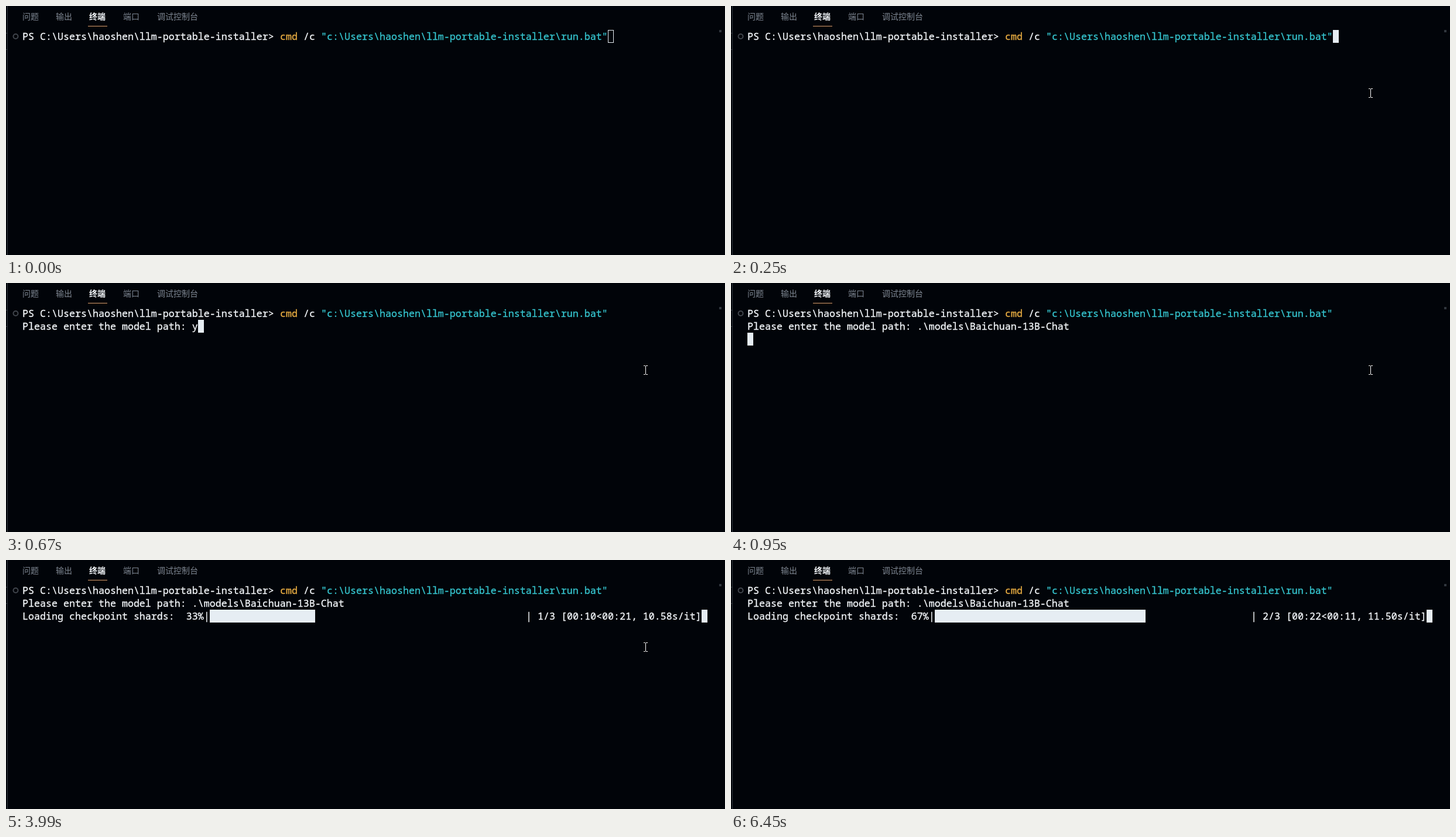
Animation, 1228 px wide and 426 px high, one loop 8000 ms. Source, as an HTML page with a canvas:

```html
<!DOCTYPE html>
<html lang="zh-CN">
<head>
<meta charset="utf-8">
<title>Terminal</title>
<style>
  html, body { margin: 0; width: 100%; height: 100%; overflow: hidden; background: #010409; }
  canvas { display: block; width: 1228px; height: 426px; }
</style>
</head>
<body>
<canvas id="stage" width="1228" height="426"></canvas>
<script>
const LOOP = 8000;
const LEFT = 28, TOP = 41, CELL_W = 10, CELL_H = 22, BASELINE = 17;
const FG = "#f4f7fa", BLOCK = "#e6edf3", DIM = "#7d8590", LINE = "#30363d";
const MONO = '16.667px "Noto Sans Mono", monospace';
const TAB_FONT = '14px "Noto Sans CJK SC", "Noto Sans CJK", sans-serif';

const ctx = document.getElementById("stage").getContext("2d", { alpha: false });

const DIR = String.raw`:\Users\haoshen\llm-portable-installer`;
const COMMAND = [
  ["PS C" + DIR + "> ", FG],
  ["cmd", "#e8ac42"],
  [" /c ", FG],
  ['"c' + DIR + String.raw`\run.bat"`, "#36c5cf"],
];
const COMMAND_COLS = COMMAND.reduce((n, [text]) => n + text.length, 0);

const TABS = [["问题", 28], ["输出", 85], ["终端", 142], ["端口", 200], ["调试控制台", 258]];

const QUESTION = "Please enter the model path: ";
const ANSWERS = [
  [380, ""],
  [530, String.raw`.\models\chatglm2-6b`],
  [670, "y"],
  [750, String.raw`.\models\Baichuan-13B-Chat`],
];
const ENTER_AT = 950, FOCUS_AT = 250;

// time, percent, filled cells, bar cells, counter
const PROGRESS = [
  [1830, "  0", 0, 62, "0/3 [00:00<?, ?it/s]"],
  [3990, " 33", 18, 54, "1/3 [00:10<00:21, 10.58s/it]"],
  [6450, " 67", 36, 54, "2/3 [00:22<00:11, 11.50s/it]"],
];

// time, x, y; a row without a place hides the pointer
const POINTER = [
  [20, 1144, 358], [60, 1130, 303], [100, 1114, 243], [140, 1102, 194],
  [180, 1095, 163], [220, 1092, 149],
  [4770, 1128, 174], [4795, 1197, 218], [4820],
];

const latest = (steps, t) => steps.filter(([at]) => at <= t).pop();

function rect(x, y, w, h, color) {
  ctx.fillStyle = color;
  ctx.fillRect(x, y, w, h);
}

// The thin outline gives the terminal text its medium weight.
function write(text, col, row, color = FG) {
  const x = LEFT + col * CELL_W, y = TOP + row * CELL_H + BASELINE;
  ctx.font = MONO;
  ctx.fillStyle = ctx.strokeStyle = color;
  ctx.lineWidth = .35;
  ctx.fillText(text, x, y);
  ctx.strokeText(text, x, y);
}

function fillCells(col, row, count) {
  rect(LEFT + col * CELL_W, TOP + row * CELL_H, count * CELL_W, CELL_H, BLOCK);
}

function drawPanel() {
  rect(0, 0, 1228, 426, "#010409");
  rect(2, 0, 1, 426, LINE);
  rect(0, 46, 2, 1, LINE);
  rect(0, 74, 2, 1, LINE);
  rect(1218, 41, 4, 4, LINE);
  for (const [label, x] of TABS) {
    const active = label === "终端";
    ctx.font = (active ? "bold " : "") + TAB_FONT;
    ctx.fillStyle = active ? FG : DIM;
    ctx.fillText(label, x, 23);
  }
  rect(140, 34, 33, 1, "#e0a06c");
  ctx.strokeStyle = "#40454c";
  ctx.lineWidth = 2;
  ctx.beginPath();
  ctx.arc(16.5, 52, 4, 0, Math.PI * 2);
  ctx.stroke();
}

function drawCommand() {
  let col = 0;
  for (const [text, color] of COMMAND) {
    write(text, col, 0, color);
    col += text.length;
  }
}

function drawCursor(t, answer, progress) {
  if (progress) return fillCells(116, 2, 1);
  if (t >= ENTER_AT) return fillCells(0, 2, 1);
  if (answer) return fillCells(QUESTION.length + answer[1].length, 1, 1);
  if (t >= FOCUS_AT) return fillCells(COMMAND_COLS, 0, 1);
  ctx.strokeStyle = BLOCK;
  ctx.lineWidth = 1;
  ctx.strokeRect(LEFT + COMMAND_COLS * CELL_W + .5, TOP + .5, CELL_W - 1, CELL_H - 1);
}

function drawProgress([, percent, filled, width, counter]) {
  const head = "Loading checkpoint shards: " + percent + "%|";
  write(head, 0, 2);
  fillCells(head.length, 2, filled);
  write("| " + counter, head.length + width, 2);
}

function drawPointer(x, y) {
  rect(x, y - 7, 1, 14, "#fff");
  for (const edge of [y - 8, y + 7]) {
    rect(x - 3, edge, 3, 1, "#fff");
    rect(x + 1, edge, 3, 1, "#fff");
  }
}

function draw(t) {
  const answer = latest(ANSWERS, t);
  const progress = latest(PROGRESS, t);
  const pointer = latest(POINTER, t);
  drawPanel();
  drawCommand();
  if (answer) write(QUESTION + answer[1], 0, 1);
  if (progress) drawProgress(progress);
  drawCursor(t, answer, progress);
  if (pointer && pointer.length > 1) drawPointer(pointer[1], pointer[2]);
}

function tick() {
  draw(performance.now() % LOOP);
  requestAnimationFrame(tick);
}
tick();
</script>
</body>
</html>
```
